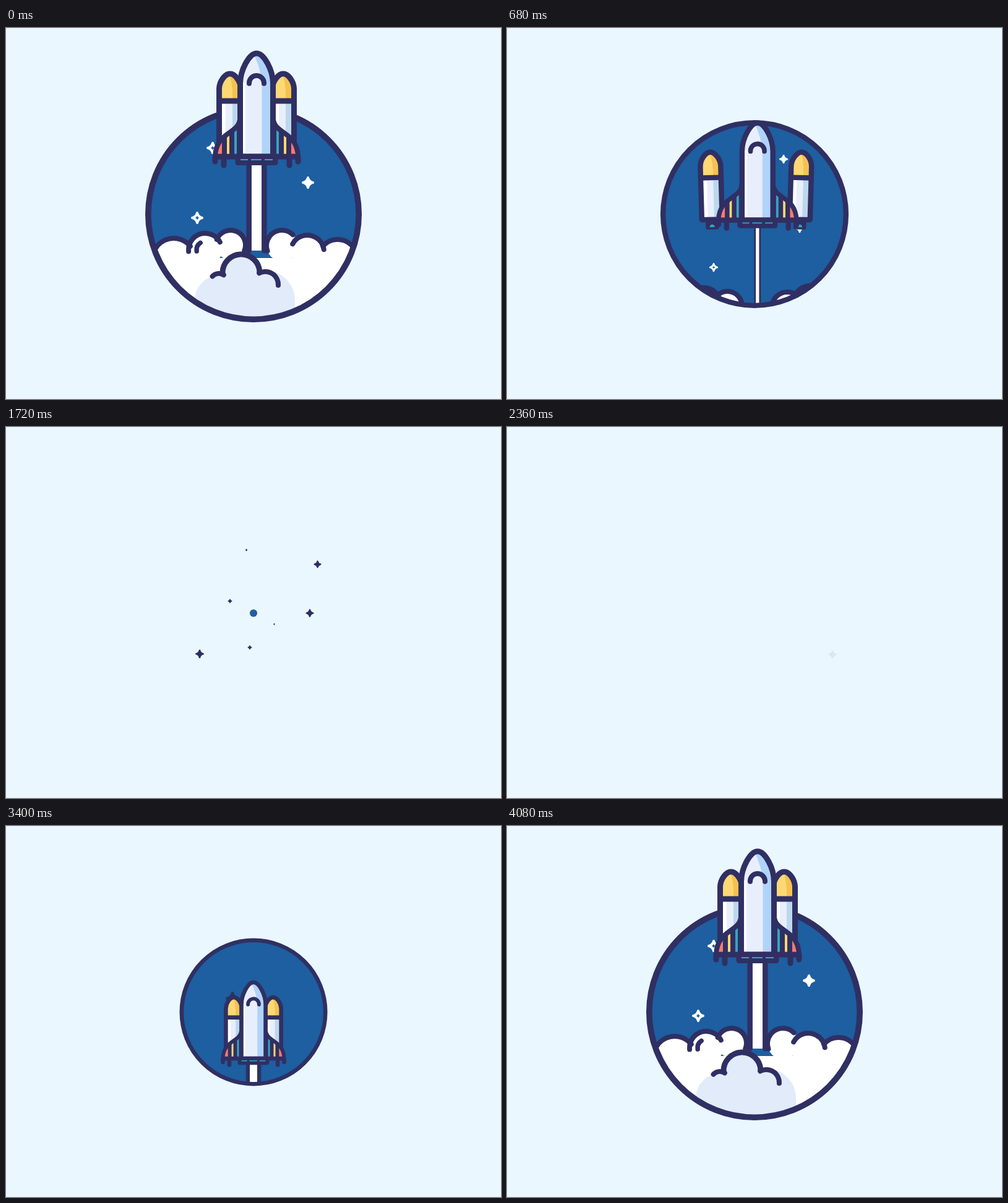
Animation, 800 px wide and 600 px high, one loop 4.12 s. Source, as an HTML page with a canvas:

```html
<!DOCTYPE html>
<html lang="en">
<head>
<meta charset="utf-8">
<title>Rocket launch</title>
<style>
html, body { margin: 0; width: 100%; height: 100%; overflow: hidden; background: #eaf7fe; }
canvas { display: block; }
</style>
</head>
<body>
<canvas id="stage" width="800" height="600"></canvas>
<script>
const ctx = document.getElementById('stage').getContext('2d');
const LOOP = 4120, STEP = 40, CX = 400, CY = 301;
const DARK = '#302f63', BLUE = '#1d5fa0', TEAL = '#35a5c0', SKY = '#eaf7fe',
  LIGHT = '#e8eefc', SHADE = '#b0d3fa', YELLOW = '#fed873', RED = '#f97b6c', MIST = '#e1ebfa';

const clamp = (v, lo = 0, hi = 1) => Math.min(hi, Math.max(lo, v));

// Smooth monotone curve through time, value pairs.
function key(t, ...p) {
  const n = p.length / 2;
  const grade = i => i < 0 || i > n - 2 ? 0 : (p[2 * i + 3] - p[2 * i + 1]) / (p[2 * i + 2] - p[2 * i]);
  const tangent = i => {
    const a = grade(i - 1), b = grade(i);
    return a * b <= 0 ? 0 : 2 * a * b / (a + b);
  };
  if (t <= p[0]) return p[1];
  for (let i = 0; i < n - 1; i++) {
    const t0 = p[2 * i], h = p[2 * i + 2] - t0;
    if (t > t0 + h) continue;
    const u = (t - t0) / h, a = p[2 * i + 1], b = p[2 * i + 3];
    return a + (b - a) * u * u * (3 - 2 * u)
      + h * u * (1 - u) * (tangent(i) * (1 - u) - tangent(i + 1) * u);
  }
  return p[2 * n - 1];
}

function fill(path, color) { ctx.fillStyle = color; ctx.fill(path); }
function line(path, width, color = DARK) {
  ctx.lineWidth = width;
  ctx.strokeStyle = color;
  ctx.stroke(path);
}
function box(x, y, w, h, color) { ctx.fillStyle = color; ctx.fillRect(x, y, w, h); }
function arc(x, y, r, from = 0, to = 360) {
  const path = new Path2D();
  path.arc(x, y, r, from * Math.PI / 180, to * Math.PI / 180);
  return path;
}
function inside(path, draw) {
  ctx.save();
  ctx.clip(path);
  draw();
  ctx.restore();
}
function placed(x, y, scale, angle, draw) {
  ctx.save();
  ctx.translate(x, y);
  ctx.rotate(angle);
  ctx.scale(scale, scale);
  draw();
  ctx.restore();
}

const starPath = new Path2D('M0-8Q1.5-1.5 8 0Q1.5 1.5 0 8Q-1.5 1.5-8 0Q-1.5-1.5 0-8Z');
function star(x, y, size, color, hollow) {
  if (size <= 0) return;
  placed(x, y, size / 20, 0, () => {
    if (!hollow) fill(starPath, color);
    line(starPath, 4, color);
  });
}

const hull = new Path2D('M-26.5 0V-118C-26.5-140-12-167 0-167S26.5-140 26.5-118V0Z');
const hullShade = new Path2D('M-6-168Q8-142 8.5-112V0H30V-168Z');
const fin = new Path2D('M-27-60C-30-36-66-40-67 0H-27Z');
const casing = new Path2D('M-17.5-18V-110C-17-122-8-134 0-134S17-122 17.5-110V-18Z');
const tipShade = new Path2D('M-2-136Q5-118 4-90H20V-136Z');
const feet = new Path2D('M-67 0H67M-67 0V8M-53 0V14M53 0V14M67 0V8M-30 0V9.500H30V0');
const vents = new Path2D('M-26 5H-14M-9 5H8M13 5H26');

function booster() {
  box(-9, -18, 18, 14, DARK);
  line(new Path2D('M-8-16V-4H8V-16'), 6);
  fill(arc(0, -5, 4.5, 180, 360), TEAL);
  inside(casing, () => {
    box(-20, -140, 40, 50, YELLOW);
    fill(tipShade, '#f4c250');
    box(-20, -90, 40, 75, LIGHT);
    box(-20, -90, 13, 75, '#fff');
    box(4, -90, 16, 75, '#bbd8ec');
  });
  line(casing, 9);
  line(new Path2D('M-17.500-90H17.500'), 9);
}

function wing() {
  fill(fin, DARK);
  inside(fin, () => {
    box(-64, -40, 8, 40, RED);
    box(-48, -50, 4, 50, YELLOW);
    box(-36, -60, 4, 60, TEAL);
  });
  line(fin, 8);
}

function shuttle() {
  wing();
  ctx.save();
  ctx.scale(-1, 1);
  wing();
  ctx.restore();
  inside(hull, () => {
    box(-30, -170, 60, 170, LIGHT);
    box(-30, -120, 12, 120, '#fafcff');
    fill(hullShade, SHADE);
  });
  line(hull, 9);
  line(arc(0, -119, 12, 176, 364), 8);
  box(-30, 0, 60, 10, DARK);
  line(feet, 9);
  ctx.lineCap = 'butt';
  line(vents, 2, TEAL);
  ctx.lineCap = 'round';
}

// x, y, radius, start and end angle, drift x and y
const puffs = [
  [271, 374, 34, 200, 322, 1, -11], [322, 359, 27, 175, 332, -4, 2], [363, 351, 24, 202, 382, -7, 13],
  [446, 352, 25, 160, 315, 7, 14], [487, 362, 27, 208, 352, 3, -4], [536, 374, 32, 222, 326, 0, -12]
];

function backClouds(sink, spread) {
  const moved = puffs.map(([x, y, r, a, b, dx, dy]) => [x + dx * spread, y + dy * spread + sink, r, a, b]);
  for (const [x, y, r] of moved) fill(arc(x, y, r), '#fff');
  box(200, 372 + sink, 400, 250, '#fff');
  for (const p of moved) line(arc(...p), 8);
  const [x, y] = moved[1];
  line(arc(x, y, 14, 172, 236), 7.5);
}

function frontCloud(sink) {
  placed(0, sink, 1, 0, () => {
    fill(arc(380, 396, 30), MIST);
    fill(arc(345, 440, 40), MIST);
    fill(arc(420, 440, 47), MIST);
    box(305, 440, 162, 200, MIST);
    line(arc(344, 411, 14, 222, 304), 8);
    line(arc(380, 396, 30, 178, 357), 9);
    line(arc(419, 415, 21, 242, 363), 8);
  });
}

function plume(x, top, end, scale) {
  const gap = 12.3 * scale;
  if (scale < 0.02 || end < top) return;
  box(x - gap, top, 2 * gap, end - top, '#fff');
  for (const side of [-gap, gap]) {
    const edge = new Path2D();
    edge.moveTo(x + side, top);
    edge.lineTo(x + side, end);
    line(edge, 8.5 * scale);
  }
}

// x, height at launch, open centre
const skyStars = [[334, 194, 1], [488, 250, 0], [309, 307, 1], [473, 131, 0], [347, -39, 0], [447, 19, 0]];

// x, y, growth at 1720 ms, end of fade
const sparks = [
  [388.5, 199, 4, 2200], [503.5, 222, 12, 2040], [362, 281.5, 7, 2120], [491, 301, 13, 2000],
  [433.5, 319, 3, 2240], [394, 356.5, 7, 2160], [313, 367, 14, 1960],
  [559, 262, -5, 2240], [219, 248, -12, 2350], [428, 100, -10, 2340], [352, 441, -14, 2355], [526, 368, -18, 2368]
];

function scene(t) {
  const radius = key(t, 0, 175, 320, 161.5, 560, 154, 1120, 145.5, 1500, 82, 1720, 6, 1740, 0,
    3040, 0, 3400, 119.5, 3600, 164, 3800, 179, 4080, 175);
  if (radius < 0.2) return;
  const ring = radius * 0.055, disc = arc(CX, CY, radius - ring / 2);
  const shrink = t > 1120 && t < 3000 ? clamp((radius - 25) / 120.5) : 1;
  const scale = key(t, 0, 1, 320, 0.977, 1120, 0.912, 2400, 0.912, 3040, 0, 3400, 0.738, 3600, 0.95, 3800, 1.02, 4080, 1);
  const x = key(t, 0, 405, 1120, 404.5, 3040, 400, 3400, 400, 3800, 405);
  const base = key(t, 0, 208, 320, 257.5, 560, 301, 1120, 331, 2400, 331, 3040, 310, 3200, 340,
    3400, 376, 3600, 272, 3800, 206, 4080, 208);
  const sink = key(t, 0, 0, 320, 22, 700, 90, 1000, 160, 3400, 160, 3600, 70, 3850, -4, 4080, 0);
  const spread = key(t, 0, 0, 320, 1, 3400, 1, 3800, 0);
  const jet = key(t, 0, 1, 500, 1, 800, 0, 3040, 0, 3150, 1);

  fill(disc, BLUE);
  inside(disc, () => {
    const size = key(t, 0, 20, 320, 16, 1120, 12, 1600, 0, 3500, 0, 3850, 20);
    const fall = t < 2000 ? t * 0.284 : 0;
    for (const [sx, sy, hollow] of skyStars) star(sx, sy + fall, size, '#fff', hollow);
    star(366, 279, key(t, 3260, 0, 3400, 22, 3540, 0), DARK);
    if (sink < 150) backClouds(sink, spread);
    plume(x, base + 10, 360 + sink * 1.7, scale * jet);
    if (sink < 150) frontCloud(sink);
  });
  line(disc, ring);

  const frame = arc(CX, CY, radius);
  frame.rect(320, 0, 160, CY);
  inside(frame, () => placed(CX, CY, shrink, 0, () => {
    ctx.translate(-CX, -CY);
    const early = t < 2400;
    const offset = early ? key(t, 0, 43, 320, 49, 700, 72, 1120, 112, 1500, 220) : 43 * scale;
    const drop = early ? key(t, 0, 208, 320, 262, 560, 309, 1120, 378, 1500, 400) : base;
    const middle = early ? key(t, 0, 405, 320, 404.5, 1120, 400) : x;
    const tilt = early ? key(t, 320, 0, 1120, 0.094, 1500, 0.15) : 0;
    for (const side of [-1, 1]) placed(middle + side * offset, drop, scale, side * tilt, booster);
    placed(x, base, scale, 0, shuttle);
  }));
}

function draw(now) {
  let t = Math.floor(now % LOOP / STEP) * STEP;
  if (t > 2360 && t < 3080) t = 2360;
  box(0, 0, 800, 600, SKY);
  ctx.lineCap = ctx.lineJoin = 'round';
  scene(t);
  if (t < 3080) {
    for (const [x, y, grown, end] of sparks) {
      ctx.globalAlpha = clamp((end - t) / 160);
      star(x, y, clamp(grown + (t - 1720) / 12, 0, 14), DARK);
    }
    ctx.globalAlpha = 1;
  }
  requestAnimationFrame(draw);
}
requestAnimationFrame(draw);
</script>
</body>
</html>
```
